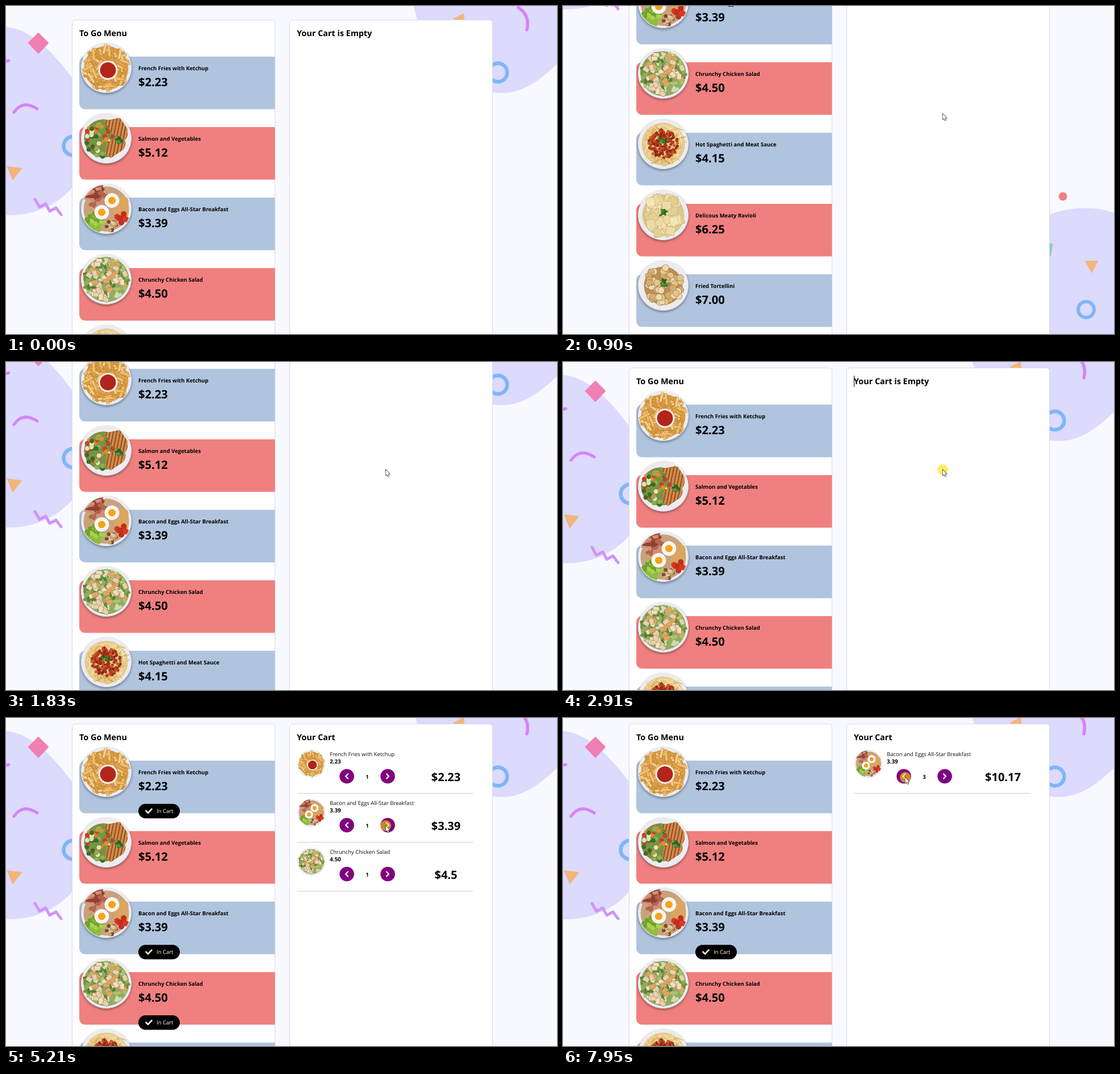
Recreate the animation shown at these times as an HTML page with a canvas. Size 970 by 577 pixels, loop 8 s.

```html
<!DOCTYPE html>
<html lang="en">
<head>
<meta charset="utf-8">
<title>To Go Menu</title>
<style>
html, body { margin: 0; width: 100%; height: 100%; overflow: hidden; background: #f8f8ff; }
canvas { display: block; }
</style>
</head>
<body>
<canvas id="stage" width="970" height="577"></canvas>
<script>
const LOOP = 8000, STEP = 67.5;
const stage = document.getElementById('stage').getContext('2d');
let g = stage;

// drawing helpers
const disc = (x, y, r, color) => {
  g.fillStyle = color;
  g.beginPath();
  g.arc(x, y, r, 0, 7);
  g.fill();
};
const ring = (x, y, r, width, color) => {
  g.strokeStyle = color;
  g.lineWidth = width;
  g.beginPath();
  g.arc(x, y, r, 0, 7);
  g.stroke();
};
const fillPath = (d, color) => {
  g.fillStyle = color;
  g.fill(new Path2D(d));
};
const strokePath = (d, width, color) => {
  g.strokeStyle = color;
  g.lineWidth = width;
  g.lineCap = g.lineJoin = 'round';
  g.stroke(new Path2D(d));
};
const softShape = (d, color) => { fillPath(d, color); strokePath(d, 2, color); };
const rounded = (x, y, w, h, r, color) => {
  g.fillStyle = color;
  g.beginPath();
  g.roundRect(x, y, w, h, r);
  g.fill();
};
const text = (s, x, y, size, weight = 700, color = '#000', align = 'left') => {
  g.font = `${weight} ${size}px "Open Sans", "Noto Sans", sans-serif`;
  g.textAlign = align;
  g.fillStyle = color;
  g.fillText(s, x, y);
};

// food: seeded scatter of simple pieces
let seed = 7;
const rand = () => (seed = (seed * 16807) % 2147483647) / 2147483647;
const scatter = (n, radius, colors, piece, cx = 0, cy = 0) => {
  for (let i = 0; i < n; i++) {
    const a = rand() * 6.283, r = radius * Math.sqrt(rand());
    g.save();
    g.translate(cx + r * Math.cos(a), cy + r * Math.sin(a));
    g.rotate(rand() * 6.283);
    piece(colors[i % colors.length]);
    g.restore();
  }
};
const dot = r => c => disc(0, 0, r, c);
const bar = (w, h) => c => rounded(-w / 2, -h / 2, w, h, 1.5, c);
const edged = (w, h, edge) => c => { bar(w + 1.2, h + 1.2)(edge); bar(w, h)(c); };
const strand = c => strokePath('M-9 0Q0 -8 9 2', 1.2, c);
const herb = (x, y) => scatter(9, 6, ['#3d7a2c', '#58973a', '#2d5f22'], bar(8, 3.6), x, y);
const fillet = d => {
  fillPath(d, '#d08a4a');
  g.save();
  g.clip(new Path2D(d));
  for (let x = -10; x < 60; x += 6) strokePath(`M${x} -40l-16 80`, 1.8, '#8a4a1f');
  g.restore();
};
const egg = (x, y) => {
  disc(x, y, 13, '#f8f6ef');
  disc(x, y, 6.5, '#f6a21b');
};

const paints = [
  function fries() {
    disc(0, 0, 39, '#dca24a');
    scatter(130, 36, ['#e3a54a', '#f0c070', '#d69a42', '#f4cf88'], edged(20, 4, '#c0853a'));
    disc(3, 4, 17, '#f1ece8');
    disc(3, 4, 14, '#b3241b');
  },
  function salmon() {
    disc(-5, 0, 34, '#7d8f48');
    scatter(60, 32, ['#6f9a38', '#dfe3b4', '#3f6a24', '#c8402a', '#e98a2c', '#8fae50'], dot(4), -6, 2);
    fillet('M-4 -31L24 -37L37 -18Q39 -4 34 2L12 -6Z');
    fillet('M2 6L30 -4Q38 8 30 20L8 35L-1 28Z');
    herb(22, 5);
  },
  function breakfast() {
    disc(0, 0, 40, '#c9a27c');
    scatter(30, 17, ['#b5654f', '#94402f', '#cf8f78'], bar(22, 6), -16, -24);
    rounded(14, -22, 25, 38, 8, '#dba662');
    scatter(60, 16, ['#8fbd3a', '#a9d152', '#6f9f2b'], dot(4), -20, 23);
    scatter(20, 10, ['#7a4f2e', '#c9a071', '#e1c7a0'], dot(3.5), 8, 30);
    scatter(8, 9, ['#d63a22', '#c22f1c'], dot(5), 27, 17);
    egg(10, -15);
    egg(-8, 6);
  },
  function salad() {
    disc(0, 0, 40, '#93ab62');
    scatter(90, 38, ['#6d983a', '#a9c56a', '#587f36', '#d3dbb0'], bar(11, 5));
    scatter(45, 37, ['#efe0c4', '#e6d2b0', '#dfa762'], edged(10, 7, '#b48d5a'));
  },
  function spaghetti() {
    disc(0, 0, 38, '#e6c98a');
    scatter(120, 35, ['#f0d99c', '#dcb666', '#f6e6b8', '#cfa552'], strand);
    scatter(170, 26, ['#b53a1c', '#8f2a14', '#cc5a30', '#a63418'], dot(2.6));
    herb(0, -7);
  },
  function ravioli() {
    disc(0, 0, 37, '#dcc78a');
    scatter(40, 33, ['#ecdba5', '#e4cf92', '#f2e6ba'], edged(15, 14, '#cbb174'));
    herb(0, -3);
  },
  function tortellini() {
    disc(0, 0, 34, '#b98f57');
    scatter(60, 33, ['#e2c48e', '#d3ae72', '#eedaae'], c => {
      disc(0, 0, 6.2, '#a87c44');
      disc(0, 0, 5.5, c);
    });
    herb(2, -4);
  }
];

const makePlate = paint => {
  const c = document.createElement('canvas');
  c.width = c.height = 270;
  g = c.getContext('2d');
  g.scale(3, 3);
  g.translate(45, 45);
  disc(0, 0, 44.5, '#d9d9de');
  disc(0, -.5, 43.8, '#ececf0');
  g.beginPath();
  g.arc(0, 0, 43, 0, 7);
  g.clip();
  paint();
  g = stage;
  return c;
};

const menu = [
  ['French Fries with Ketchup', '2.23'],
  ['Salmon and Vegetables', '5.12'],
  ['Bacon and Eggs All-Star Breakfast', '3.39'],
  ['Chrunchy Chicken Salad', '4.50'],
  ['Hot Spaghetti and Meat Sauce', '4.15'],
  ['Delicous Meaty Ravioli', '6.25'],
  ['Fried Tortellini', '7.00']
].map(([name, price], i) => ({ name, price, plate: makePlate(paints[i]) }));

// motion
const progress = (t, from, to) => Math.min(1, Math.max(0, (t - from) / (to - from)));
const easeInOut = u => (1 - Math.cos(Math.PI * u)) / 2;
const easeOut = u => 1 - (1 - u) ** 2;
const scrollAt = t =>
  Math.round(414 * easeInOut(progress(t, 430, 1022)) - 400 * easeOut(progress(t, 1369, 2134)));

// pointer stops; those with a dish are clicks that change its quantity
const stops = [
  { time: 70, x: 850, y: 541 },
  { time: 330, x: 518, y: 370 },
  { time: 2905, x: 196, y: 101, dish: 0, add: 1 },
  { time: 3380, x: 168, y: 350, dish: 2, add: 1 },
  { time: 3780, x: 170, y: 470, dish: 3, add: 1 },
  { time: 4200, x: 177, y: 271 },
  { time: 5200, x: 668, y: 189, dish: 2, add: 1 },
  { time: 5340, x: 668, y: 189, dish: 2, add: 1 },
  { time: 6100, x: 602, y: 104, dish: 0, add: -1 },
  { time: 6940, x: 602, y: 187, dish: 3, add: -1 },
  { time: 7945, x: 602, y: 104, dish: 2, add: -1 }
];
const clicks = stops.filter(s => s.add);
const PRESS = 140, REACT = 70, REST = 180, TRAVEL = 800;

function pointerAt(t) {
  let { x, y, time } = stops[0];
  for (const s of stops.slice(1)) {
    const end = s.add ? s.time - REST : s.time;
    const u = easeInOut(progress(t, Math.max(time + REACT, end - TRAVEL), end));
    x += (s.x - x) * u;
    y += (s.y - y) * u;
    time = s.time;
  }
  return [x, y];
}

const quantity = (dish, t) => clicks
  .filter(c => c.dish === dish && t >= c.time + REACT)
  .reduce((sum, c) => sum + c.add, 0);

function drawBackdrop() {
  const lilac = '#dcdafd', blue = '#7fb6f8', orange = '#f2b57c', violet = '#d583fa';
  fillPath('M0 37C45 40 85 85 116 126V320C90 350 50 368 5 368H0Z', lilac);
  softShape('M57 48L74 65L57 83L40 65Z', '#f07fb4');
  strokePath('M14 187Q30 164 55 181', 5, violet);
  strokePath('M-3 98L5 96', 5, violet);
  ring(118, 246, 16.5, 6.5, blue);
  softShape('M3 283L27 286L12 305Z', orange);
  strokePath('M51 340l8 14l11 -6l7 13l11 -6l9 12', 5, '#cf95fb');

  fillPath('M718 0C722 40 780 150 872 153C915 153 945 125 970 102V0Z', lilac);
  strokePath('M902 3Q923 16 917 42', 5.5, violet);
  softShape('M788 23L805 14L807 30Z', orange);
  ring(866, 117, 16.3, 6.5, blue);

  disc(880, 697, 7.4, '#f08080');
  fillPath('M840 738C880 712 940 714 970 726V1100H840Z', lilac);
  softShape('M840 777L861 781L858 801L840 801Z', '#7fcfc0');
  softShape('M920 811H941L931 830Z', orange);
  ring(921, 896, 14, 6, blue);
}

function drawPanel(x, title) {
  g.beginPath();
  g.roundRect(x + .5, 24.5, 357, 1200, 5);
  g.fillStyle = '#fff';
  g.fill();
  g.strokeStyle = '#d9d9ec';
  g.lineWidth = 1;
  g.stroke();
  text(title, x + 13, 53, 14.4);
}

function drawDish(dish, i, inCart) {
  const y = Math.round(89 + i * 124.1);
  rounded(129, y, 344.5, 92.5, [10, 0, 0, 10], i % 2 ? '#f08080' : '#b0c4de');
  g.save();
  g.shadowColor = 'rgba(0,0,0,.4)';
  g.shadowBlur = 4;
  g.shadowOffsetY = 2;
  g.drawImage(dish.plate, 131.5, y - 24.5, 90, 89);
  g.restore();
  text(dish.name, 233, y + 24, 9.5);
  text('$' + dish.price, 233, y + 52, 20.2);
  if (!inCart) return;
  rounded(233, y + 76, 73, 25.4, 12.7, '#000');
  strokePath(`M246.5 ${y + 88.5}l3.5 3.6l6.5 -7`, 2.6, '#fff');
  text('In Cart', 265, y + 92.3, 9.5, 400, '#fff');
}

function drawCartRow(dish, qty, row) {
  g.save();
  g.translate(0, Math.round(row * 85.8));
  g.drawImage(dish.plate, 513, 70, 49.5, 49);
  text(dish.name, 570, 81, 9.5, 400, '#111');
  text(dish.price, 570, 94, 9.8);
  for (const dir of [-1, 1]) {
    const x = 636 + 36 * dir;
    disc(x, 116.5, 12.8, '#800080');
    strokePath(`M${x - 2 * dir} 112.5l${4 * dir} 4l${-4 * dir} 4`, 2.2, '#fff');
  }
  text(qty, 636, 120.5, 9.5, 700, '#000', 'center');
  text('$' + +(qty * dish.price).toFixed(2), 774.5, 125, 20, 700, '#000', 'center');
  g.fillStyle = '#ccc';
  g.fillRect(512, 146, 310, 1);
  g.restore();
}

function drawPointer(x, y, pressed) {
  if (pressed) disc(x + .5, y + .5, 9.5, 'rgba(255,225,0,.6)');
  g.save();
  g.translate(x + .5, y + .5);
  const arrow = 'M0 0V10L2.3 8L4 11.6L5.6 10.9L4 7.5L7 7.3Z';
  strokePath(arrow, 1.4, '#222');
  fillPath(arrow, '#fff');
  g.restore();
}

function draw(t) {
  // motion advances in even steps
  const held = Math.max(0, Math.floor((t - 5) / STEP) * STEP + 7.5);
  const qty = menu.map((_, i) => quantity(i, t));
  const filled = qty.some(n => n > 0);

  g.textRendering = 'geometricPrecision';
  g.fillStyle = '#f8f8ff';
  g.fillRect(0, 0, 970, 577);
  g.save();
  g.translate(0, -scrollAt(held));
  drawBackdrop();
  drawPanel(116, 'To Go Menu');
  drawPanel(499, filled ? 'Your Cart' : 'Your Cart is Empty');
  menu.forEach((dish, i) => drawDish(dish, i, qty[i] > 0));
  let row = 0;
  menu.forEach((dish, i) => { if (qty[i]) drawCartRow(dish, qty[i], row++); });

  // text caret blinks from the first click until a button takes focus
  if (t >= 2905 && t < 5200 && (t - 2905) % 1060 < 530) {
    g.fillStyle = '#000';
    g.fillRect(512, 38, 1, 20);
  }
  g.restore();

  if (t >= 70) {
    const pressed = clicks.some(c => t >= c.time && t < c.time + PRESS);
    drawPointer(...pointerAt(held), pressed);
  }
}

const start = performance.now();
function tick() {
  draw((performance.now() - start) % LOOP);
  requestAnimationFrame(tick);
}
tick();
</script>
</body>
</html>
```
